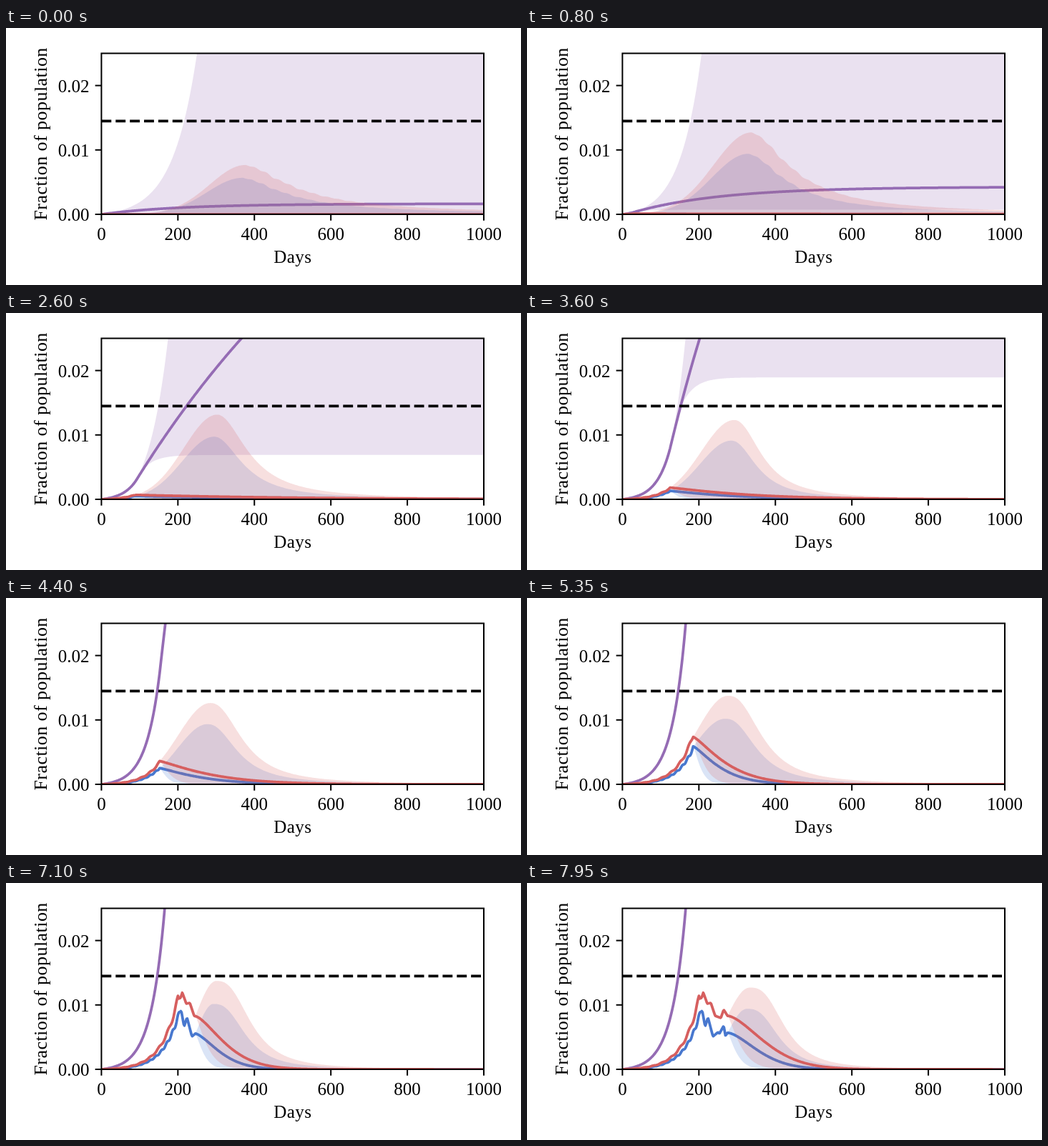
Recreate the animation shown at these times as an HTML page with a canvas. Size 720 by 360 pixels, loop 8000 ms.

```html
<!DOCTYPE html>
<html lang="en">
<head>
<meta charset="utf-8">
<title>Epidemic forecast</title>
<style>
html, body { margin: 0; width: 100%; height: 100%; overflow: hidden; background: #fff; }
canvas { display: block; width: 720px; height: 360px; }
</style>
</head>
<body>
<canvas id="c"></canvas>
<script>
const LOOP = 8000, STEP = 50, DAYS_PER_MS = 0.0346;
const LEFT = 133.4, RIGHT = 668, TOP = 35.5, BASE = 261, PX_PER_DAY = 0.5346;
const LINE = 3.75;
const PURPLE = '#956cb4';

const canvas = document.getElementById('c');
const ratio = window.devicePixelRatio || 1;
canvas.width = 720 * ratio;
canvas.height = 360 * ratio;
const ctx = canvas.getContext('2d');

// Observed cases grow in uneven steps, then follow the turns after the peak (x, height)
const red = {
  color: '#d65f5f', start: 0.86, stepAt: 242, stepRate: 0.5,
  turns: [[241, 99], [244, 100], [246.5, 107.5], [252, 92], [257, 93],
    [263, 75], [271, 72], [275, 83.5], [281, 74], [284, 73]],
  peak: 1, shift: 0, width: 1, half: 1, drop: 1
};
const blue = {
  color: '#4878cf', start: 0.63, stepAt: 219, stepRate: 0.8,
  turns: [[243, 80], [245, 82], [249, 60], [253, 72.5], [260, 46],
    [267, 52], [269, 50], [275, 61], [277.5, 47], [281, 52], [284, 51]],
  peak: 0.74, shift: -4, width: 0.93, half: 0.82, drop: 0.7
};

const mix = (a, b, k) => a + (b - a) * k;
const bell = (x, center, width) => Math.exp(-(((x - center) / width) ** 2));
const fade = (day, span) => Math.exp(-day / span);

function along(points, x) {
  let i = 1;
  while (i < points.length - 1 && points[i][0] < x) i++;
  const [x0, h0] = points[i - 1], [x1, h1] = points[i];
  return mix(h0, h1, Math.min(1, (x - x0) / (x1 - x0)));
}

function casesAt(s, x) {
  if (x > s.turns[0][0]) return along(s.turns, x);
  const stepped = x - LEFT - Math.sin(s.stepRate * (x - s.stepAt));
  return Math.max(0, s.start * (Math.exp(0.0445 * stepped) - 1));
}

function sample(from, to, f) {
  const out = [];
  for (let x = from; x < to; x++) out.push([x, f(x)]);
  out.push([to, f(to)]);
  return out;
}

function trace(points) {
  for (const [x, h] of points) ctx.lineTo(x, BASE - Math.min(h, 400));
}

function stroke(points, color) {
  ctx.beginPath();
  trace(points);
  ctx.strokeStyle = color;
  ctx.lineWidth = LINE;
  ctx.stroke();
}

function drawSeries(x0, color, past, median, upper, lower) {
  ctx.beginPath();
  trace(sample(x0, RIGHT, upper));
  trace(sample(x0, RIGHT, lower).reverse());
  ctx.globalAlpha = 0.2;
  ctx.fillStyle = color;
  ctx.fill();
  ctx.globalAlpha = 1;
  stroke(sample(LEFT, x0, past).concat(sample(x0, RIGHT, median)), color);
}

function drawTotal(day, x0) {
  const seed = 2.35;
  const past = x => seed * (Math.exp(0.0517 * (x - LEFT)) - 1);
  const h0 = past(x0);
  const rate = 0.057 * (h0 + seed), spread = 1.9 * (h0 + seed);
  const reach = 110 + 310 * bell(day, 84, 32);
  const growth = 0.0345 - 0.005 * fade(day, 20);

  const median = x => h0 + rate * reach * (1 - Math.exp((x0 - x) / reach));
  const upper = x => Math.max(median(x), h0 + spread * (Math.exp(growth * (x - x0)) - 1));
  const lower = x => Math.min(median(x), h0 * mix(2.4, 1, Math.exp((x0 - x) / 17.5)));
  drawSeries(x0, PURPLE, past, median, upper, lower);
}

function drawCases(s, day, x0) {
  const past = x => casesAt(s, x);
  const h0 = past(x0);
  const age = day / 275;
  const wave = Math.cos(0.037 * (day - 45));

  const peak = Math.max(s.peak * (120 - 50 * fade(day, 20) + 9 * wave), h0 * 1.06);
  const peakX = s.shift + Math.max(306 - 0.135 * day + 29 * fade(day, 30), x0 * 1.11);
  const rise = (peakX - x0) / Math.sqrt(Math.log2(peak / Math.max(h0, 0.02)));
  const width = s.width * (51 + 27 * fade(day, 45) - 10 * bell(day, 115, 30));
  const power = 1.6 + 0.0045 * day;
  const jag = Math.max(0, 1 - day / 75);
  const half = s.half * (46 - 12 * wave + 354 * Math.exp(-((day / 85) ** 2.5)));
  const drop = s.drop * (12 + 4 * age ** 4);

  const decay = (span, bend) => x => h0 * 2 ** -(((x - x0) / span) ** bend);
  const upper = x => {
    const d = x - peakX;
    if (d < 0) return peak * 2 ** -((d / rise) ** 2);
    const rough = d + jag * (1.9 * Math.sin(d * 0.37) + 1.1 * Math.sin(d * 0.19));
    return peak / (1 + (rough / width) ** power);
  };
  drawSeries(x0, s.color, past, decay(half, 1 + 0.6 * age ** 2), upper, decay(drop, 1.27));
}

function label(text, x, y, align, size = 25) {
  ctx.font = size + 'px "Liberation Serif", serif';
  ctx.textAlign = align;
  ctx.fillText(text, x, y);
}

function tick(x, y, dx, dy) {
  ctx.beginPath();
  ctx.moveTo(x, y);
  ctx.lineTo(x + dx, y + dy);
  ctx.stroke();
}

function drawAxes() {
  ctx.strokeStyle = ctx.fillStyle = '#000';
  ctx.lineWidth = 2;
  ctx.strokeRect(LEFT, TOP, RIGHT - LEFT, BASE - TOP);
  ctx.letterSpacing = '0px';
  for (let d = 0; d <= 1000; d += 200) {
    const x = LEFT + d * PX_PER_DAY;
    tick(x, BASE, 0, 8.75);
    label(String(d), x, 297, 'center');
  }
  for (let i = 0; i < 3; i++) {
    const y = BASE - i * 90.2;
    tick(LEFT, y, -8.75, 0);
    label('0.0' + i, 116.5, y + 9, 'right');
  }
  ctx.letterSpacing = '0.45px';
  label('Days', 400.8, 328.5, 'center');
  ctx.save();
  ctx.translate(57, 148.4);
  ctx.rotate(-Math.PI / 2);
  label('Fraction of population', 0, 0, 'center', 26);
  ctx.restore();
}

function draw(ms) {
  const day = Math.floor(ms / STEP) * STEP * DAYS_PER_MS;
  const x0 = LEFT + day * PX_PER_DAY;
  ctx.setTransform(ratio, 0, 0, ratio, 0, 0);
  ctx.fillStyle = '#fff';
  ctx.fillRect(0, 0, 720, 360);

  ctx.save();
  ctx.beginPath();
  ctx.rect(LEFT, TOP, RIGHT - LEFT, BASE - TOP);
  ctx.clip();
  ctx.lineJoin = 'round';
  drawTotal(day, x0);
  drawCases(blue, day, x0);
  drawCases(red, day, x0);
  ctx.setLineDash([13.875, 6]);
  stroke([[LEFT, 130.6], [RIGHT, 130.6]], '#000');
  ctx.restore();

  drawAxes();
}

function loop() {
  draw(performance.now() % LOOP);
  requestAnimationFrame(loop);
}
loop();
</script>
</body>
</html>
```
